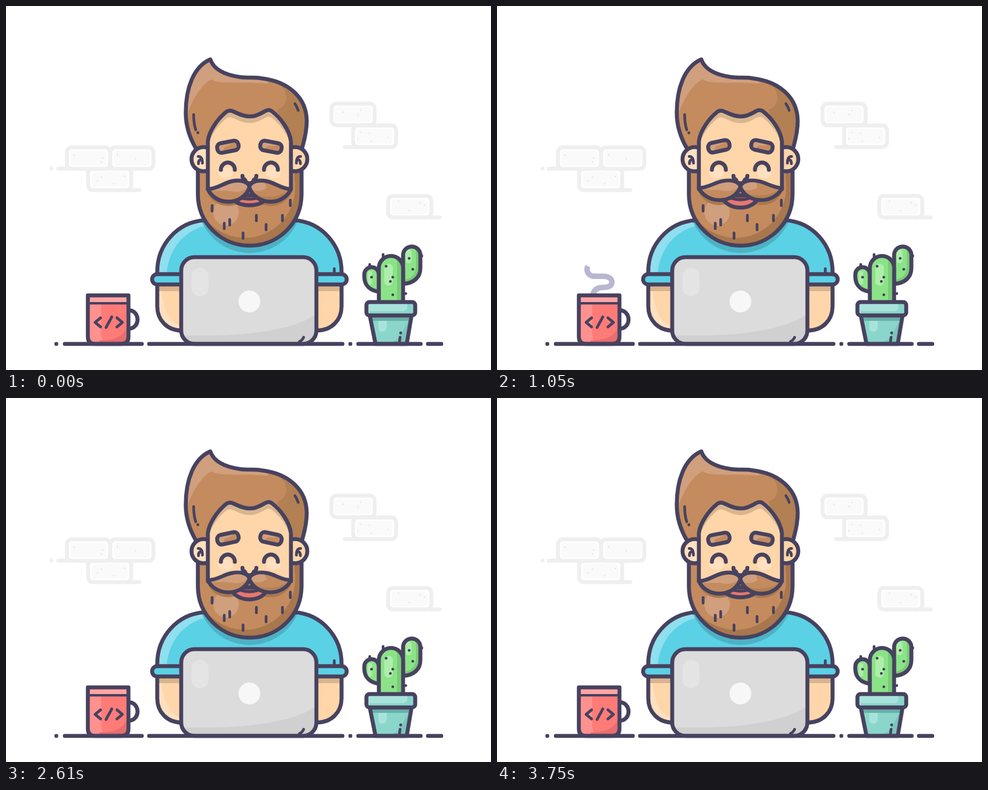
An HTML page with a canvas that plays this animation: 800x600 px, repeating every 3.78 s.

```html
<!DOCTYPE html>
<html lang="en">
<head>
<meta charset="utf-8">
<title>Bearded developer at work</title>
<style>
html, body { margin: 0; width: 100%; height: 100%; overflow: hidden; background: #fff; }
canvas { display: block; }
</style>
</head>
<body>
<canvas id="stage" width="800" height="600"></canvas>
<script>
const ctx = document.getElementById('stage').getContext('2d');
const LOOP = 3780;
const INK = '#47425f';
const STROKE = 6.5;
const HAIR = { base: '#c48b5f', light: '#d09f7d', dark: '#b38054', deep: '#a9774e' };
const SKIN = { base: '#ffd6a9', light: '#ffe0c0', dark: '#d9b58f' };
const SHIRT = { base: '#5bd1e5', light: '#8fdfee', dark: '#4db2c4' };
const GREEN = { base: '#8be387', light: '#aeeeab', dark: '#79cb78' };
const TEAL = { base: '#8ad6cb', light: '#a8e3db', dark: '#69b0a8' };

const path = d => new Path2D(d);

function pill(x, y, w, h, r) {
  const p = new Path2D();
  p.roundRect(x, y, w, h, r);
  return p;
}

function oval(x, y, rx, ry = rx) {
  const p = new Path2D();
  p.ellipse(x, y, rx, ry, 0, 0, Math.PI * 2);
  return p;
}

function fill(p, color) {
  ctx.fillStyle = color;
  ctx.fill(p);
}

function line(p, width = STROKE, color = INK) {
  ctx.strokeStyle = color;
  ctx.lineWidth = width;
  ctx.stroke(p);
}

function group(draw) {
  ctx.save();
  draw();
  ctx.restore();
}

function inside(p, draw) {
  group(() => { ctx.clip(p); draw(); });
}

// Filled shape, clipped shading, then the outline on top.
function solid(p, color, shade) {
  fill(p, color);
  if (shade) inside(p, shade);
  line(p);
}

function dots(points, r, color = INK) {
  for (const [x, y] of points) fill(oval(x, y, r), color);
}

function mirrored(draw) {
  draw(1);
  group(() => { ctx.translate(803, 0); ctx.scale(-1, 1); draw(-1); });
}

// Smooth interpolation through [time, value] pairs.
function track(keys, t) {
  for (let i = 1; i < keys.length; i++) {
    const [t0, a] = keys[i - 1], [t1, b] = keys[i];
    if (t <= t1) {
      const u = (t - t0) / (t1 - t0);
      return a + (b - a) * u * u * (3 - 2 * u);
    }
  }
  return keys[keys.length - 1][1];
}

const ramp = (t, from, to) => Math.min(1, Math.max(0, (t - from) / (to - from)));

function brick(x, y, specks) {
  fill(pill(x, y, 71, 35.5, 8), '#fff');
  fill(pill(x + 6, y + 6, 59, 24, 4), '#fafafa');
  line(pill(x, y, 71, 35.5, 8), STROKE, '#efefef');
  dots(specks.map(([dx, dy]) => [x + dx, y + dy]), 1.3, '#e8e8e8');
}

function drawWall() {
  line(path('M75 268h.01M86 268H172M200 303.5H220M559 232.5H580M700 348.5H715'), STROKE, '#efefef');
  brick(135.5, 268, [[15, 20], [22, 14], [42, 25], [60, 13]]);
  brick(100.5, 233, [[12, 13], [57, 24], [59, 18]]);
  brick(172, 233, [[12, 12], [41, 19]]);
  brick(537, 161, [[19, 14], [44, 18], [48, 11]]);
  brick(572.5, 197, [[13, 11], [8, 22], [30, 26], [27, 13], [58, 20]]);
  brick(630.5, 313, [[17, 9], [35, 24], [53, 11], [60, 15]]);
}

const STEAM = path('M158 476C160 468 165 464 174 464C184 464 189.5 461 189.5 455' +
  'C189.5 449 184 445.5 174 445.5H160A11.5 11.5 0 0 1 160 422.5H174' +
  'C183 422.5 189 417 189 409C189 401 183 396 174 396H153');
const STEAM_LENGTH = 192;

function drawSteam(t) {
  const tail = STEAM_LENGTH * ramp(t, 1280, 2450);
  const head = STEAM_LENGTH * ramp(t, 300, 1750);
  if (head <= tail) return;
  group(() => {
    ctx.lineCap = 'butt';
    ctx.globalAlpha = 1 - ramp(t, 1380, 2545);
    ctx.setLineDash([head - tail, 1000]);
    ctx.lineDashOffset = -tail;
    line(STEAM, 9, '#b9b6d2');
  });
}

function drawMug() {
  line(path('M202 501.5C222 501.5 222 532 202 532'));
  solid(path('M135 477H202V545Q202 557 190 557H147Q135 557 135 545Z'), '#ff7b78', () => {
    fill(path('M135 492H157V540Q157 550 165 557H135Z'), '#ff918f');
    fill(path('M135 477H202V490H135Z'), '#ffa5a4');
    fill(path('M202 520Q198 552 155 551L150 560H205Z'), '#e66e6e');
  });
  line(path('M135 490H202'), 4.2);
  line(path('M156 514L147 521.5L156 529M174.5 512.5L165 530M183 514L192 521.5L183 529'), 4.7);
}

function drawCactus() {
  const glow = (x, y, w, h) => fill(pill(x, y, w, h, w / 2), GREEN.light);
  solid(path('M615 471C600 469 591 460 591 446V442.5a12 12 0 0 1 24 0Z'), GREEN.base,
    () => glow(597, 437, 7, 22));
  solid(path('M655 458C673 457 683.5 447 683.5 432V409.5a14.3 14.3 0 0 0 -28.5 0Z'), GREEN.base, () => {
    fill(path('M676 395H686V440L655 462V452Q676 448 676 430Z'), GREEN.dark);
    glow(659, 401, 10, 23);
  });
  solid(path('M615 490V432a20 20 0 0 1 40 0V490Z'), GREEN.base, () => {
    fill(path('M645 410H656V490H645Z'), GREEN.dark);
    glow(624, 425, 14, 36);
  });
  dots([[627, 429], [638, 447], [634, 454], [638, 476], [603, 447], [665, 416], [671, 434]], 2.3);
  line(path('M600 426V430M622 409.5V413M685.5 412h.5M659 474h.5'), 4.5);

  solid(path('M600 510L609.5 557H661L669 510Z'), TEAL.base, () => {
    fill(pill(614, 506, 14, 31, 7), TEAL.light);
    fill(path('M669 510H675V560H622Q650 552 655 535Z'), '#7cc5bb');
    fill(path('M595 510H675V519H595Z'), TEAL.dark);
  });
  solid(pill(594.5, 488, 80.5, 22, 5), TEAL.light, () => {
    fill(path('M662 486H678V512H600V503H655Q662 503 662 496Z'), TEAL.base);
  });
  line(path('M650 546L649 554'), 4.5);
  dots([[651, 539]], 2.4);
}

const TORSO = path('M249.5 450V438C249.5 394 282 356 328 353H475C521 356 553.5 394 553.5 438V450Z');
const BEARD = path('M316.5 262V310C316.5 358 355 395 402 395C449 395 487.5 358 487.5 310V262Z');
const HAIRDO = path('M337 88C309 100 296.5 136 296.5 176C296.5 200 305 221 314 236H488' +
  'C491 224 496 210 496 190C496 150 465 124 420 119C410 117 400 119 385 117C352 112 341 100 337 88Z');
const FACE = path('M333 302V223C335 205 350 185 364 174C374 168 382 182 402 182' +
  'C422 182 428 167 438 173C453 184 468 205 470 223V302Z');
const WHISKERS = path('M402 298C398 288 385 286 372 289C358 292 350 301 333 302' +
  'C338 313 350 322 365 322.5C382 323 397 314 402 298Z');

function drawBody(bob) {
  solid(path('M249.5 455V495C249.5 518 266 535 290 535H512C537 535 553.5 518 553.5 495V455Z'), SKIN.base, () => {
    fill(path('M249 455H256C258 495 265 520 290 528V540H249Z'), SKIN.light);
    fill(path('M249 455H554V470H249Z'), SKIN.dark);
  });
  solid(TORSO, SHIRT.base, () => {
    fill(path('M249 450H264C266 405 290 367 340 360V350H249Z'), SHIRT.light);
    group(() => { ctx.translate(0, bob + 12); fill(BEARD, SHIRT.dark); });
  });
  line(path('M541.5 433V440'), 4.5);
  mirrored(() => solid(pill(241, 442, 60, 17, 8.5), SHIRT.base));
}

function drawLaptop() {
  solid(pill(289, 414, 223, 143, 22), '#dcdcdc', () => {
    fill(path('M289 543C380 545 465 539 512 508V560H289Z'), '#d0d0d0');
    fill(pill(306, 432, 28, 46, 13), '#e4e4e4');
  });
  line(path('M484 553Q489 551 491 546'), 4.5);
  fill(oval(401.5, 487, 18), '#f7f7f7');
}

function drawMouth(open) {
  const dip = 334 + 5.2 * open;
  const lip = 325 + 2 * open;
  solid(path(`M371 312C376 ${dip} 427 ${dip} 432 312Z`), '#94524f', () => {
    const tongue = path(`M376 312Q401.5 ${lip} 427 312V345H376Z`);
    fill(tongue, '#e9776d');
    line(tongue, 4.5);
  });
}

function drawWhiskers(lift) {
  mirrored(side => group(() => {
    ctx.translate(401.5, 296 - 0.5 * lift);
    ctx.rotate(lift * 0.022);
    ctx.scale(1, 1 - 0.08 * lift);
    ctx.translate(-401.5, -296);
    solid(WHISKERS, HAIR.base, () => {
      if (side > 0) {
        fill(path('M330 304C350 306 362 303 374 306C388 308 396 302 402 296V280H330Z'), HAIR.light);
      } else {
        fill(path('M402 298C398 306 385 308 373 300L380 280H404Z'), HAIR.light);
        fill(path('M330 300C348 314 375 320 394 308L390 328H330Z'), HAIR.dark);
      }
    });
  }));
}

function drawBrow(x, y, tilt) {
  group(() => {
    ctx.translate(x, y);
    ctx.rotate(tilt);
    solid(pill(-17.8, -8, 35.6, 16, 7), HAIR.base, () => {
      fill(path('M-20 -9H12Q8 -1 -3 -1Q-9 0 -9 9H-20Z'), HAIR.light);
    });
  });
}

function drawHead(bob, lift, open) {
  ctx.save();
  ctx.translate(0, bob);

  solid(BEARD, HAIR.deep, () => {
    fill(oval(394, 299, 83), HAIR.base);
    fill(path('M317 250H476V310H317Z'), HAIR.base);
    fill(oval(363, 340, 21, 22), HAIR.light);
    group(() => {
      ctx.translate(0, 7 - 2 * lift);
      mirrored(() => fill(WHISKERS, HAIR.deep));
    });
  });
  const hairs = [[340, 329], [369, 352], [360, 358], [391, 374], [413, 345], [429, 360], [456, 345], [469, 320]];
  for (const [x, y] of hairs) line(path(`M${x} ${y}v9`), 4.5);

  solid(HAIRDO, HAIR.base, () => {
    fill(path('M290 205C303 160 320 130 339 121C352 130 390 124 432 128L436 112L337 80L290 130Z'), HAIR.light);
    fill(path('M446 126C468 138 467 165 448 171L465 240H500V120Z'), HAIR.dark);
  });
  line(path('M309.5 179Q309.5 194 313 204M476.5 161Q480 166 482 172'), 4.5);
  dots([[316.5, 209]], 2.4);

  mirrored(side => {
    solid(oval(326, 252.5, 20), side > 0 ? SKIN.light : SKIN.base);
    line(path('M317 248Q324 247.5 324 259M317.5 260Q317 254 322 253'), 4.5);
  });

  fill(FACE, SKIN.dark);
  inside(FACE, () => {
    group(() => { ctx.translate(0, 11); fill(FACE, SKIN.base); });
    mirrored(() => fill(oval(362, 275, 12, 9), SKIN.light));
  });
  line(FACE);

  mirrored(() => line(path('M354.5 270a11.5 12 0 0 1 23 0')));
  drawBrow(366, 232 - lift, -0.19 - 0.03 * lift);
  drawBrow(437, 232 - lift, 0.19 + 0.03 * lift);

  drawMouth(open);
  drawWhiskers(lift);
  const nose = path('M390 280C390 286 394 285 394.5 287C396 294 407 294 408.5 287C409 285 413 286 413 280');
  fill(nose, SKIN.base);
  line(nose);
  ctx.restore();
}

const LIFT = [[0, 0], [660, 0.65], [1530, 1], [2160, 1], [2610, 0.65], [3300, 1], [LOOP, 0]];
const OPEN = [[0, 0], [660, 1], [1530, 0.85], [2160, 0.7], [2610, 0.9], [3300, 0.2], [LOOP, 0]];

function render(t) {
  const bob = t < 1100 ? 2.8 * Math.sin(Math.PI * t / 1100) ** 2 : 0;
  ctx.fillStyle = '#fff';
  ctx.fillRect(0, 0, 800, 600);
  ctx.lineCap = ctx.lineJoin = 'round';

  drawWall();
  drawSteam(t);
  drawMug();
  drawCactus();
  drawBody(bob);
  drawHead(bob, track(LIFT, t), track(OPEN, t));
  drawLaptop();
  line(path('M83 557h.01M97 557H224M236 557H555M568 557h.01M581 557H684M696 557H718'));
}

const start = performance.now();
function tick() {
  render((performance.now() - start) % LOOP);
  requestAnimationFrame(tick);
}
tick();
</script>
</body>
</html>
```
